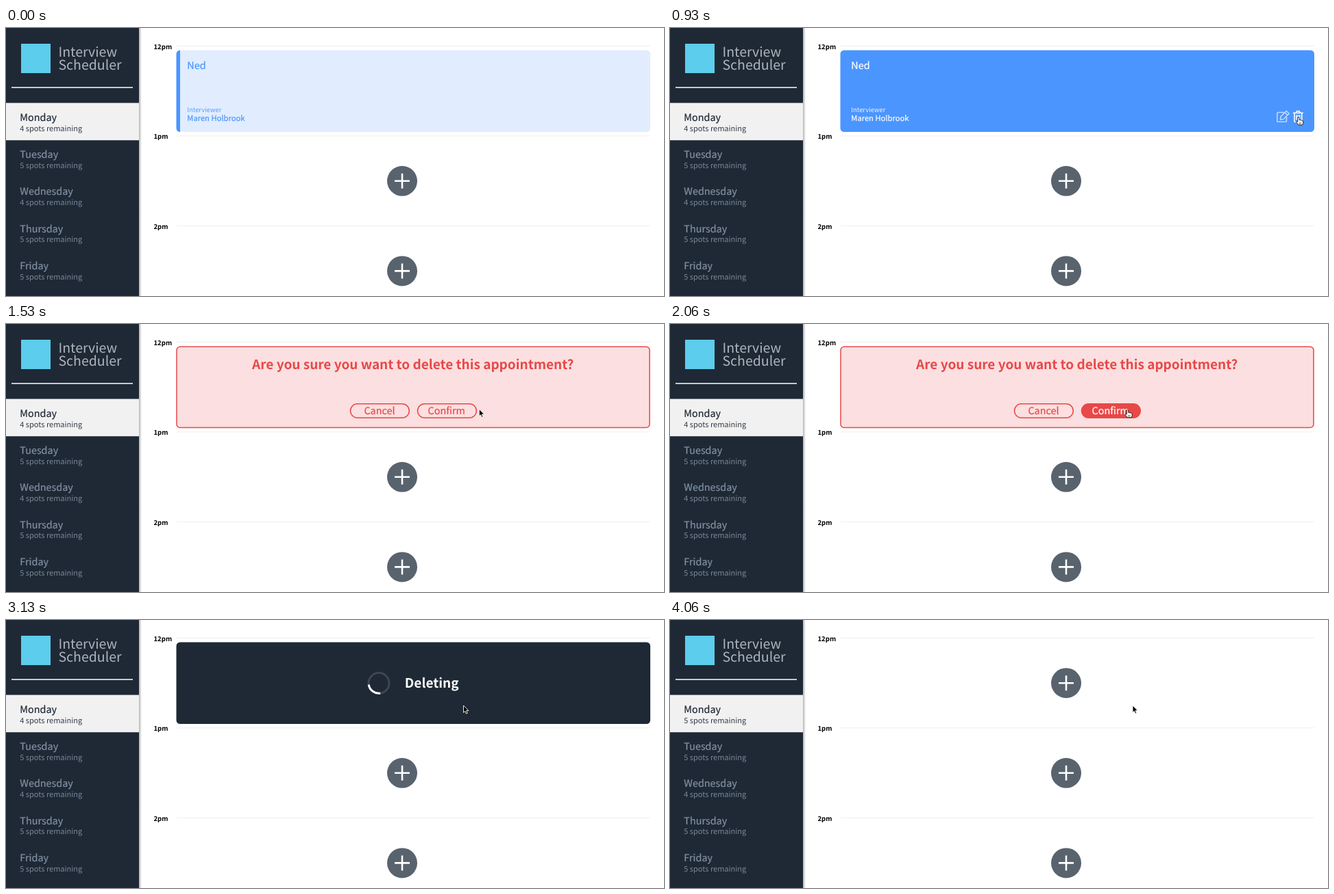
An HTML page that plays this animation: 960x392 px, repeating every 4.12 s.

```html
<!DOCTYPE html>
<html lang="en">
<head>
<meta charset="utf-8">
<title>Scheduler</title>
<style>
  html, body { margin: 0; width: 100%; height: 100%; overflow: hidden; background: #fff; }
  svg { display: block; font-family: "Noto Sans CJK JP", "Noto Sans CJK SC", "Noto Sans CJK", "Open Sans", sans-serif; }
  text { fill: currentColor; text-rendering: geometricPrecision; }
  .day, .person { stroke: currentColor; stroke-width: .2; }
  .day { font-size: 14.4px; }
  .spots { font-size: 11px; font-weight: 300; opacity: .9; }
  .hour { font-size: 9.6px; font-weight: 700; }
  .logo { font-size: 19.5px; font-weight: 300; color: #adb5bd; }
  .role { font-size: 9.4px; font-weight: 300; opacity: .9; }
  .person { font-size: 11.2px; }
  .big { font-size: 19px; font-weight: 700; }
  .mid { text-anchor: middle; }
  .line { fill: none; stroke: #fff; stroke-width: 1.6; stroke-linejoin: round; stroke-linecap: round; }
</style>
</head>
<body>
<svg width="960" height="392" viewBox="0 0 960 392">
  <defs>
    <linearGradient id="shade">
      <stop offset="0" stop-color="#000" stop-opacity=".3"/>
      <stop offset="1" stop-color="#000" stop-opacity="0"/>
    </linearGradient>
    <g id="plus">
      <circle r="22" fill="#59636e"/>
      <path d="M-11 0H11M0-11V11" stroke="#fff" stroke-width="2.6"/>
    </g>
  </defs>

  <rect width="194" height="392" fill="#1f2935"/>
  <rect x="194" width="4" height="392" fill="url(#shade)"/>
  <rect x="22" y="23" width="43" height="43" fill="#5ccdec"/>
  <text class="logo" x="76.5" y="41.7">Interview</text>
  <text class="logo" x="76.5" y="61.4">Scheduler</text>
  <path d="M8 87H185" stroke="#fff" stroke-width="1.6"/>
  <rect y="109.6" width="194" height="54.6" fill="#f1f1f1"/>
  <g id="days"></g>
  <g id="hours"></g>

  <g id="show">
    <rect id="card" x="248.5" y="32.5" width="691.5" height="119.5" rx="5.5"/>
    <path id="edge" d="M254 32.5V152A5.5 5.5 0 0 1 248.5 146.5V38A5.5 5.5 0 0 1 254 32.5Z" fill="#4b95ff"/>
    <g id="info">
      <text class="day" x="264.3" y="60.2">Ned</text>
      <text class="role" x="264.3" y="122.6">Interviewer</text>
      <text class="person" x="264.3" y="136.3">Maren Holbrook</text>
    </g>
    <g id="icons" class="line">
      <g opacity=".65">
        <path d="M895.5 123.5H887.5Q885.8 123.5 885.8 125.2V135.6Q885.8 137.3 887.5 137.3H897.8Q899.5 137.3 899.5 135.6V130.5"/>
        <path d="M891 129.6 899.3 121.3 903.2 125.2 894.9 133.5 890.5 134ZM897 123.6 900.9 127.5"/>
      </g>
      <path id="trash" d="M909.5 124.3H923.3M913.4 124 914.6 121.6H918.2L919.4 124M911 124.5V135.8Q911 137.5 912.7 137.5H920.1Q921.8 137.5 921.8 135.8V124.5M914 127.8V134M916.4 127.8V134M918.8 127.8V134"/>
    </g>
  </g>

  <g id="ask" color="#e84848">
    <rect x="249" y="33.2" width="690" height="118.2" rx="5" fill="#fcdfe0" stroke="currentColor" stroke-width="1.5"/>
    <text class="big mid" x="593.7" y="66.2">Are you sure you want to delete this appointment?</text>
    <g stroke="currentColor" stroke-width="1.5">
      <rect x="502.5" y="116.7" width="85.8" height="20.6" rx="10.3" fill="none"/>
      <rect id="confirm" x="600.5" y="116.7" width="85.8" height="20.6" rx="10.3"/>
    </g>
    <text class="day mid" x="545" y="132.2">Cancel</text>
    <text id="confirmText" class="day mid" x="642.7" y="132.2">Confirm</text>
  </g>

  <g id="busy">
    <rect x="248.5" y="32.5" width="691.5" height="119.5" rx="5.5" fill="#1f2935"/>
    <g fill="none" stroke-width="3">
      <circle cx="544" cy="92.3" r="15" stroke="#3d4651"/>
      <path id="arc" d="M533.4 102.9A15 15 0 0 1 533.4 81.7" stroke="#fff"/>
    </g>
    <text class="big" x="581.8" y="99.4" color="#fff">Deleting</text>
  </g>

  <use id="empty" href="#plus" x="578" y="92.2"/>

  <g id="cursor" stroke-linejoin="round">
    <path id="arrow" d="M0 0V10.4L2.3 8.3 3.9 12 5.7 11.2 4.1 7.6H7.4Z" stroke="#fff" stroke-width=".9"/>
    <path id="hand" d="M-1.2 1Q0-.6 1.2 1V4.6Q2.4 3.8 3.3 5Q4.5 4.4 5.2 5.6Q6.8 5.2 6.8 7Q7 9.5 5.6 11.8H-.2Q-1.6 9.6-3.6 7.4Q-3.6 5.8-1.2 7.2ZM1.3 8.3V10.3M3.3 8.3V10.3" fill="#fff" stroke="#111" stroke-width=".9"/>
  </g>
</svg>
<script>
const LOOP = 4120, HOVER = 400, ASK = 1060, DELETE = 2130, DONE = 3260;
const $ = id => document.getElementById(id);
const show = (id, on) => $(id).setAttribute("display", on ? "inline" : "none");

$("days").innerHTML = ["Monday", "Tuesday", "Wednesday", "Thursday", "Friday"].map((day, i) => {
  const y = 135.7 + i * 54.3;
  return `<g color="${i ? "#8091a4" : "#1f2935"}">
    <text class="day" x="20.3" y="${y}">${day}</text>
    <text class="spots" x="20.3" y="${y + 14.8}"><tspan>${i == 2 ? 4 : 5}</tspan> spots remaining</text></g>`;
}).join("");
const spots = document.querySelector("#days tspan");

$("hours").innerHTML = ["12pm", "1pm", "2pm"].map((hour, i) => {
  const y = i * 131.6;
  return `<text class="hour" x="215.4" y="${y + 30.6}">${hour}</text>
    <path d="M249 ${y + 26.2}H940" stroke="#efefef"/>
    ${i ? `<use href="#plus" x="578" y="${y + 92.2}"/>` : ""}`;
}).join("");

// Pointer path: time, x, y
const path = [
  [130, 964, 160], [400, 936, 147], [680, 917, 130], [1130, 917, 130],
  [1480, 691, 124.5], [1560, 690, 124.5], [1730, 667.5, 125],
  [3800, 667.5, 125], [4060, 675, 125]
];

function pointer(t) {
  const i = path.findIndex(p => p[0] > t);
  if (i < 0) return path[path.length - 1].slice(1);
  if (!i) return path[0].slice(1);
  const [t0, x0, y0] = path[i - 1], [t1, x1, y1] = path[i];
  const u = (t - t0) / (t1 - t0), k = u * u * (3 - 2 * u);
  return [x0 + (x1 - x0) * k, y0 + (y1 - y0) * k];
}

function draw(t) {
  const [x, y] = pointer(t);
  const hover = t >= HOVER;
  const asking = t >= ASK && t < DELETE;
  const onConfirm = asking && x > 600 && x < 686.5;
  const hand = onConfirm || (t < ASK && x < 924);

  show("show", t < ASK);
  show("ask", asking);
  show("busy", t >= DELETE && t < DONE);
  show("empty", t >= DONE);
  show("edge", !hover);
  show("icons", hover);
  $("card").setAttribute("fill", hover ? "#4b95ff" : "#e1edfe");
  $("info").setAttribute("color", hover ? "#fff" : "#4b95ff");
  $("trash").setAttribute("opacity", hand ? 1 : .65);
  $("confirm").setAttribute("fill", onConfirm ? "#e84848" : "none");
  $("confirmText").setAttribute("color", onConfirm ? "#fff" : "#e84848");
  $("arc").setAttribute("transform", `rotate(${110 + (t - 2530) * 360 / 1100} 544 92.3)`);
  spots.textContent = t < DONE ? 4 : 5;

  show("arrow", !hand);
  show("hand", hand);
  $("cursor").setAttribute("transform", `translate(${x} ${y})`);
}

const start = performance.now();
function tick() {
  draw((performance.now() - start) % LOOP);
  requestAnimationFrame(tick);
}
tick();
</script>
</body>
</html>
```
